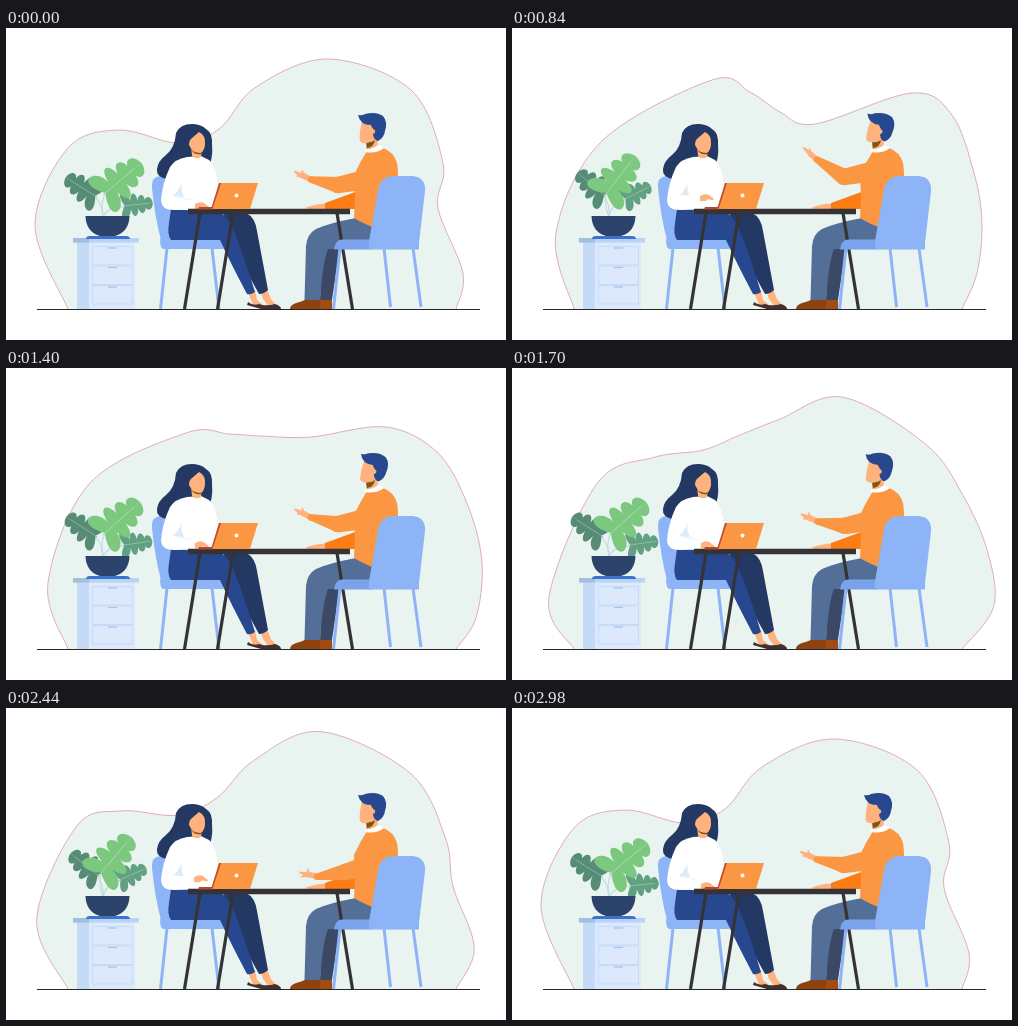
Animation, 500 px wide and 312 px high, one loop 3040 ms. Source, as an HTML page with a canvas:

```html
<!DOCTYPE html>
<html lang="en">
<head>
<meta charset="utf-8">
<title>Office meeting</title>
<style>
html, body { margin: 0; width: 100%; height: 100%; overflow: hidden; background: #fff; }
canvas { display: block; width: 500px; height: 312px; }
</style>
</head>
<body>
<canvas id="stage"></canvas>
<script>
const LOOP = 3040, STEP = 20, BEGIN = 120, END = 2980;
const canvas = document.getElementById('stage');
const ctx = canvas.getContext('2d');
const ratio = window.devicePixelRatio || 1;
canvas.width = 500 * ratio;
canvas.height = 312 * ratio;
ctx.scale(ratio, ratio);
ctx.lineJoin = 'round';

const SKIN = '#ffb27d', NAVY = '#233862', BLUE = '#27488f', CHAIR = '#8cb4f6';
const ORANGE = '#fb9743', DARK = '#363336', SHADE = '#7c5716';

// Backdrop poses: key points of the outline from left to right
const calm = [29,197, 62,120, 113,102, 172,115, 213,101, 250,59, 322,31, 405,62, 437,135, 432,180, 457,245];
const twin = [44,205, 90,113, 200,52, 238,64, 268,84, 303,96, 400,65, 440,87, 462,145, 470,195, 465,245];
const flat = [42,215, 84,115, 180,65, 223,66, 255,68, 305,69, 380,59, 432,85, 462,138, 476,195, 470,250];
const peak = [35,232, 85,115, 130,97, 180,89, 217,70, 255,47, 315,20, 408,73, 447,125, 473,180, 484,235];
const POSES = [calm, twin, flat, peak, calm];
const TIMES = [220, 840, 1400, 1840, END];

const clamp = v => Math.max(0, Math.min(1, v));

// Smooth interpolation through all poses, at rest on both ends
function morph(t) {
  const last = TIMES.length - 1;
  t = Math.max(TIMES[0], Math.min(END, t));
  let i = 0;
  while (i < last - 1 && t > TIMES[i + 1]) i++;
  const span = TIMES[i + 1] - TIMES[i], u = (t - TIMES[i]) / span;
  const slope = (k, n) => k === 0 || k === last ? 0
    : (POSES[k + 1][n] - POSES[k - 1][n]) / (TIMES[k + 1] - TIMES[k - 1]);
  const u2 = u * u, u3 = u2 * u;
  return POSES[i].map((a, n) =>
    a * (2 * u3 - 3 * u2 + 1) + POSES[i + 1][n] * (3 * u2 - 2 * u3) +
    span * (slope(i, n) * (u3 - 2 * u2 + u) + slope(i + 1, n) * (u3 - u2)));
}

function fill(color, d) {
  ctx.fillStyle = color;
  ctx.fill(new Path2D(d));
}

function line(color, width, d) {
  ctx.strokeStyle = color;
  ctx.lineWidth = width;
  ctx.stroke(new Path2D(d));
}

function dot(color, x, y, r) {
  ctx.fillStyle = color;
  ctx.beginPath();
  ctx.arc(x, y, r, 0, 7);
  ctx.fill();
}

function limb(color, x1, y1, r1, x2, y2, r2) {
  const a = Math.atan2(y2 - y1, x2 - x1) + Math.PI / 2;
  const c = Math.cos(a), s = Math.sin(a);
  dot(color, x1, y1, r1);
  dot(color, x2, y2, r2);
  ctx.beginPath();
  ctx.moveTo(x1 + c * r1, y1 + s * r1);
  ctx.lineTo(x2 + c * r2, y2 + s * r2);
  ctx.lineTo(x2 - c * r2, y2 - s * r2);
  ctx.lineTo(x1 - c * r1, y1 - s * r1);
  ctx.fill();
}

function turned(deg, x, y, draw) {
  ctx.save();
  ctx.translate(x, y);
  ctx.rotate(deg * Math.PI / 180);
  ctx.translate(-x, -y);
  draw();
  ctx.restore();
}

function backdrop(pose) {
  const p = [62, 281, ...pose, 450, 281];
  const n = p.length / 2;
  const at = (i, k) => p[2 * Math.max(0, Math.min(n - 1, i)) + k];
  const path = new Path2D();
  path.moveTo(p[0], p[1]);
  for (let i = 0; i < n - 1; i++) {
    const c1 = k => at(i, k) + (at(i + 1, k) - at(i - 1, k)) / 6;
    const c2 = k => at(i + 1, k) - (at(i + 2, k) - at(i, k)) / 6;
    path.bezierCurveTo(c1(0), c1(1), c2(0), c2(1), at(i + 1, 0), at(i + 1, 1));
  }
  ctx.fillStyle = '#e9f4f1';
  ctx.fill(path);
  ctx.strokeStyle = 'rgba(218,138,138,.75)';
  ctx.lineWidth = 0.9;
  ctx.stroke(path);
}

// Split leaf: four shrinking fingers on each side of the midrib
function leaf(color, vein, x, y, deg, len) {
  ctx.save();
  ctx.translate(x, y);
  ctx.rotate(deg * Math.PI / 180);
  ctx.scale(len, len);
  ctx.fillStyle = color;
  for (const side of [-1, 1]) {
    ctx.beginPath();
    ctx.moveTo(.06, 0);
    for (let k = 0; k < 4; k++) {
      const u = k * .25, w = side * (.56 - .1 * k), end = k < 3 ? side * .13 : 0;
      ctx.bezierCurveTo(k ? u + .04 : -.3, w, u + .22, w, u + .25, end);
    }
    ctx.closePath();
    ctx.fill();
  }
  line(vein, 0.8 / len, 'M0 0H.85');
  ctx.restore();
}

function cabinet() {
  fill('#c4daf6', 'M71 214H84V281H71Z');
  fill('#dce8fb', 'M83 214H129V281H83Z');
  fill('#b9d3f4', 'M67 210H133V214.5H67Z');
  fill('#a3bfdf', 'M67 210H83V214.5H67Z');
  for (let i = 0; i < 3; i++) {
    const y = 218.5 + 19.5 * i;
    line('#c0d7f4', 0.8, `M86.5 ${y}H126.5V${y + 18.5}H86.5Z`);
    line('#a6c2e6', 1.2, `M102 ${y + 1.5}H111`);
  }
}

function plant(swing) {
  const stem = '#c2dbe2';
  turned(8 * swing, 97, 188, () => {
    line(stem, 1.2, 'M97 189Q97 176 88 168');
    leaf('#568b75', '#85b09b', 91, 169, -148, 37);
  });
  turned(-21 * swing, 97, 188, () => {
    line(stem, 1.2, 'M97 189Q102 178 118 179');
    leaf('#61a080', '#8bbfa2', 117, 178, -6, 30);
  });
  turned(-12 * swing, 97, 188, () => {
    line(stem, 1.2, 'M97 189Q94 177 99 166');
    leaf('#7cc87f', '#a9deaa', 97, 167, -40, 50);
  });
  fill('#3d72cc', 'M80 211Q80 208 84 208H120Q124 208 124 211Z');
  fill('#2c446b', 'M79.5 188H123.5Q123 204 109 208H94Q80 204 79.5 188Z');
}

function woman(lift) {
  // chair
  fill(CHAIR, 'M155 212Q149 190 146 160Q145 149 154 148H163L168 212Z');
  line(CHAIR, 3, 'M161 220L154.5 281M206 220L213 281');
  fill(CHAIR, 'M154 211H212Q218 212 217.5 221H157Q154 220 154 211Z');
  // flowing hair
  fill(NAVY, 'M170 105Q174 96 186 96Q201 96 205 110Q208 124 204 136L180 140Q176 146 161 151Q150 149 151 141Q152 133 160 127Q169 120 170 105Z');
  // legs
  fill(SKIN, 'M254 262L261 261L265 271L271 278L263 279L257 271Z');
  fill(NAVY, 'M218 185H240Q249 189 251 203L262 262Q258 266 253 266L219 204Z');
  fill(SKIN, 'M242 264L249 262L251 272L257 277L247 277Z');
  fill(BLUE, 'M165 181H207Q219 185 224 195Q233 212 249 264Q245 267 241 266Q224 234 214 212H165Q161 207 163 195Z');
  fill('#41302f', 'M242 274Q247 278 253 276Q260 278 263 281H255L241 277Z');
  fill('#41302f', 'M256 277Q263 278 269 276Q275 278 275 281H262Z');
  // blouse
  fill('#fff', 'M181 129Q169 131 164 139Q156 156 155 173Q156 182 168 182L207 181Q212 170 212 160Q211 139 203 132L195 128Z');
  fill('#dcebf8', 'M177 150Q174 162 167 168L178 169Q173 160 177 150Z');
  line('#e3eef8', 0.8, 'M167 168Q178 170 185 172');
  // head
  fill(SKIN, 'M185 117L186 128Q190 132 195 129L196 120Z');
  fill(SHADE, 'M186 122Q190 126 196 123L195.5 126Q190 127 187 124Z');
  fill(SKIN, 'M193 104Q200 107 199 117Q198 124 194 125Q186 124 183 117Q183 112 186 110Z');
  fill(NAVY, 'M194 102Q200 106 200 118L203 131Q208 117 205 107Q202 99 194 102Z');
  // forearm and hand
  const y = 177 - 8 * lift, x = 194 - lift;
  limb('#fff', 163, 174, 7, x - 7, y + 2, 3.5);
  fill(SKIN, `M${x - 5} ${y - 1}Q${x} ${y - 4} ${x + 4} ${y - 2}L${x + 9} ${y + 2}Q${x + 8} ${y + 4} ${x + 3} ${y + 2}L${x + 1} ${y + 4}L${x - 5} ${y + 4}Z`);
}

function laptop() {
  fill('#b04836', 'M193 179H207V181.5H192Z');
  fill('#c5492b', 'M213 155H217L208 181H205Z');
  fill(ORANGE, 'M215 155H252L244 181H206.5Z');
  dot('#fff', 230.5, 167.5, 2);
}

function table() {
  fill(DARK, 'M182 180.7H344V186.2H182Z');
  line(DARK, 3.2, 'M194 185L178.5 281M227 185L211.5 281M331 185L346.5 281');
}

function hand(wx, wy, hx, hy) {
  const dx = hx - wx, dy = hy - wy;
  const mx = wx + dx * .45, my = wy + dy * .45;
  limb(SKIN, wx, wy, 2.8, mx, my, 2.8);
  limb(SKIN, mx, my, 2.4, hx, hy, 1);
  limb(SKIN, mx, my, 2.2, hx + 1 - dy * .2, hy + 4, .9);
  limb(SKIN, mx, my, 1.6, mx - 1, my - 5, .8);
}

// raise runs from -1 (arm low over the table) to 1 (arm high)
function gesture(raise) {
  const low = Math.max(0, -raise), high = Math.max(0, raise);
  const ex = 332 + 9 * low, ey = 157 - 8 * raise;
  const wx = 304 + 7 * low, wy = 151 - 20 * raise;
  hand(wx, wy, 289 + 6 * low + 3 * high, 144 - 24 * raise);
  limb(ORANGE, 358, ey - 5, 10, ex, ey, 8.2);
  limb(ORANGE, ex, ey, 8.2, wx + 1, wy + .5, 3.3);
}

function man(tilt, raise) {
  // legs and shoes
  fill('#a24b12', 'M310 281Q311 276 315 271H326V281Z');
  fill('#3b4966', 'M316 218H334L326 272H314Z');
  fill('#8e420f', 'M284 281Q284 277 290 275Q298 273 300 271H315L313 281Z');
  fill('#546f97', 'M350 190Q323 195 310 201Q301 206 300 218L298.5 272H314Q317 232 322 221H372L368 192Z');
  // far arm resting on the table
  fill('#fc7d16', 'M352 163L319 175V181H352Z');
  fill(SKIN, 'M319 175.5Q308 176 299 180Q303 182 319 181Z');
  // neck and torso
  fill(SKIN, 'M360 111L360 121Q366 125 372 119L371 108Z');
  fill(SHADE, 'M360 114Q365 115 369 112Q368 119 361 120Z');
  fill(ORANGE, 'M361 123Q368 124 377 120Q388 124 391 135Q394 150 388 190L369 200Q356 195 348 190L349 168L348 147Q354 134 361 123Z');
  fill('#fff', 'M359 121Q366 122 372 117L378 120Q370 126 359 124Z');
  turned(tilt, 367, 116, () => {
    fill(SKIN, 'M356 93L354 103L353.5 112Q355 116 361 115Q368 113 370 107V94Z');
    fill(BLUE, 'M352 87Q356 88 359 86Q370 83 377 88Q382 94 379 103Q378 110 372 113Q368 112 367 107L368 102Q365 98 365 97Q354 97 352 87Z');
    dot(SKIN, 367, 103.5, 2.2);
  });
  gesture(raise);
}

function manChair() {
  line(CHAIR, 3, 'M334 220L327.5 281M378 220L384.5 279M407 220L415 279');
  fill('#7ba3ec', 'M328 221.5Q329 212 336 211.5H366V221.5Z');
  fill(CHAIR, 'M363 213L372 162Q374 149 387 148H406Q420 149 419 163L413 215V221.5H363Z');
}

function render(t) {
  const u = clamp((t - BEGIN) / (END - BEGIN));
  const wave = Math.sin(2 * Math.PI * u);
  const swing = wave * wave;
  const raise = wave * Math.abs(wave);
  const tilt = 7 * Math.sin(Math.PI * clamp(u / .65));
  ctx.fillStyle = '#fff';
  ctx.fillRect(0, 0, 500, 312);
  backdrop(morph(t));
  cabinet();
  plant(swing);
  woman(swing);
  man(tilt, raise);
  table();
  laptop();
  manChair();
  fill('#262626', 'M31 281H474V282H31Z');
}

const start = performance.now();
function tick() {
  const t = (performance.now() - start) % LOOP;
  render(Math.floor(t / STEP) * STEP);
  requestAnimationFrame(tick);
}
tick();
</script>
</body>
</html>
```
